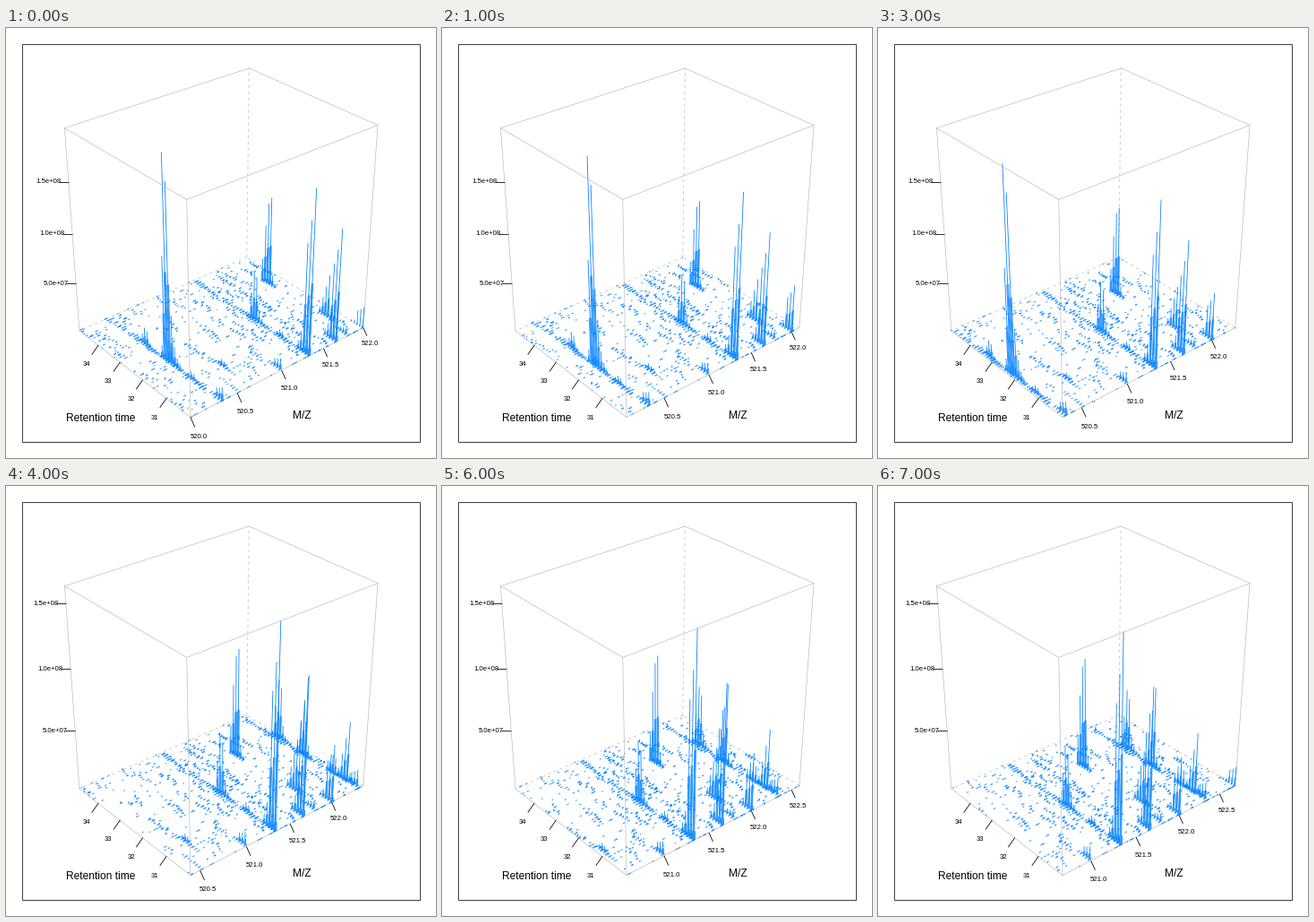
Write a matplotlib script that moves like this. It is 480x480 px and loops after 8000 ms.

```python
import numpy as np
import matplotlib.pyplot as plt
from matplotlib.animation import FuncAnimation
from matplotlib.collections import LineCollection

SIZE, DPI = 480, 100
PX = 72 / DPI            # one pixel in points
BLUE, GREY = "#0080ff", "#bebebe"
SPAN = 2.0               # width of the M/Z window
DV = 1 / 45              # distance between two scans
STEP = 0.008             # distance between two M/Z samples

plt.rcParams["font.family"] = "Liberation Sans"
rng = np.random.default_rng(12)

# Box corners: (M/Z, retention time, intensity) -> screen pixel
CORNERS = {
    (0, 0, 0): (206, 434.5), (1, 0, 0): (399, 334.5),
    (1, 1, 0): (268.5, 256), (0, 1, 0): (82, 338),
    (0, 0, 1): (201.5, 191.5), (1, 0, 1): (415, 108.5),
    (1, 1, 1): (271.5, 45), (0, 1, 1): (65.5, 111.5),
}


def fit_camera():
    """Least-squares perspective matrix from the eight corners."""
    rows, rhs = [], []
    for (u, v, w), (x, y) in CORNERS.items():
        rows.append([u, v, w, 1, 0, 0, 0, 0, -x * u, -x * v, -x * w])
        rows.append([0, 0, 0, 0, u, v, w, 1, -y * u, -y * v, -y * w])
        rhs += [x, y]
    sol = np.linalg.lstsq(np.array(rows, float), np.array(rhs, float), rcond=None)[0]
    return np.append(sol, 1).reshape(3, 4)


CAMERA = fit_camera()


def project(u, v, w):
    u, v, w = np.broadcast_arrays(*(np.asarray(a, float) for a in (u, v, w)))
    x, y, d = np.tensordot(CAMERA, np.stack([u, v, w, np.ones_like(u)]), 1)
    return np.stack([x / d, y / d], axis=-1)


# ---- synthetic spectrum: rows of (M/Z, scan position, intensity / 1e7)
points = []


def dash(mz, v, n, h):
    """Short run of low samples inside one scan."""
    for i in range(n):
        points.append((mz + (i - n / 2) * STEP, v, h * rng.uniform(0.3, 1)))


def spike(mz, v, h):
    """Narrow peak inside one scan."""
    for i in range(-2, 3):
        points.append((mz + i * STEP, v, h * np.exp(-0.8 * i * i)))


# first scan relative to the top, then the share of the top in each scan
ROUND = (-2, [0.06, 0.52, 1, 0.88, 0.25, 0.1, 0.05, 0.03])
LATE = (-3, [0.25, 0.65, 0.92, 1, 0.12, 0.04])
RISE = (-3, [0.12, 0.4, 0.7, 1, 0.15, 0.05])
FRONT = (0, [1, 0.81, 0.67, 0.12, 0.05])

PEAKS = [
    (520.33, 0.458, 19.9, ROUND), (521.33, 0.460, 5.1, ROUND),
    (522.34, 0.436, 6.8, RISE), (521.84, 0.676, 9.3, LATE),
    (522.36, 0.689, 5.1, ROUND), (521.876, 0.206, 4.4, RISE),
    (521.33, 0.003, 16.3, FRONT), (521.66, 0.003, 11.4, FRONT),
    (522.006, 0.003, 4.8, FRONT), (522.35, 0.100, 5.0, RISE),
    (522.35, 0.020, 1.4, FRONT), (522.34, 0.210, 1.5, ROUND),
    (522.70, 0.003, 1.6, FRONT), (521.00, 0.010, 1.1, FRONT),
    (520.33, 0.660, 1.7, ROUND), (520.33, 0.250, 0.7, ROUND),
    (520.34, 0.003, 1.3, FRONT), (520.65, 0.240, 0.6, ROUND),
    (521.33, 0.240, 0.7, ROUND), (521.81, 0.020, 0.6, FRONT),
]

for mz, v0, top, (first, shape) in PEAKS:
    side = 1 if first == 0 else -1
    for i, part in enumerate(shape):
        v = v0 + side * (first + i) * DV
        if 0 <= v <= 1:
            spike(mz, v, top * part)

# isotope ridges running through all scans
for ridge in (520.33, 521.33, 522.345):
    for j in range(46):
        if rng.random() < 0.88:
            dash(ridge + rng.normal(0, 0.008), j * DV, rng.integers(3, 8),
                 rng.uniform(0.04, 0.14))

# short streaks over a few scans
for _ in range(80):
    mz, start = rng.uniform(520, 522.72), rng.integers(0, 42)
    strong = rng.uniform(0.03, 0.25)
    for j in range(start, min(start + rng.integers(3, 8), 46)):
        dash(mz + rng.normal(0, 0.015), j * DV, rng.integers(2, 5),
             strong * rng.uniform(0.3, 1))

# scattered noise, a little denser in the first scan
for _ in range(430):
    dash(rng.uniform(520, 522.72), rng.integers(0, 46) * DV,
         rng.integers(2, 4), rng.uniform(0.01, 0.06))
for _ in range(18):
    dash(rng.uniform(520, 522.72), 0, rng.integers(3, 8), 0.03)

MZ, SCAN, HEIGHT = np.array(points).T

# ---- static parts
fig = plt.figure(figsize=(SIZE / DPI, SIZE / DPI), dpi=DPI, facecolor="white")
ax = fig.add_axes([0, 0, 1, 1])
ax.set_xlim(0, SIZE)
ax.set_ylim(SIZE, 0)
ax.axis("off")


def edge(a, b, hidden=False, z=1):
    (x0, y0), (x1, y1) = project(*a), project(*b)
    ax.plot([x0, x1], [y0, y1], color=GREY, lw=0.7 * PX, zorder=z,
            ls=(0, (5, 5)) if hidden else "-")


def label(x, y, text="", size=7.8):
    return ax.text(x, y, text, size=size * PX, ha="center", va="center", zorder=5)


ax.add_patch(plt.Rectangle((18, 18), 444, 444, fill=False, ec="#404040", lw=PX))

BACK = (1, 1, 0)
names = list(CORNERS)
for i, a in enumerate(names):
    for b in names[i + 1:]:
        if sum(p != q for p, q in zip(a, b)) == 1:
            on_top = a[2] == 1 or (a[:2] == (0, 0) and b[2] == 1)
            edge(a, b, BACK in (a, b), 4 if on_top else 1)

label(106, 436, "Retention time", 12)
label(330.5, 433, "M/Z", 12)

for rt in range(31, 35):
    x, y = project(0, 0.2 + 0.205 * (rt - 31), 0)
    ax.plot([x, x - 7], [y, y + 10], color="black", lw=0.8 * PX)
    label(x - 13, y + 21.5, str(rt))

# ---- moving parts
stems = LineCollection([], colors=BLUE, linewidths=0.8 * PX,
                       capstyle="projecting", zorder=3)
ticks = LineCollection([], colors="black", linewidths=0.8 * PX, zorder=5)
ax.add_collection(stems, autolim=False)
ax.add_collection(ticks, autolim=False)
mz_labels = [label(0, 0) for _ in range(5)]
z_labels = [label(0, 0) for _ in range(3)]


def update(k):
    low = 520 + 0.1 * k
    seen = (MZ >= low - 1e-6) & (MZ <= low + SPAN + 1e-6)
    u, v, h = (MZ[seen] - low) / SPAN, SCAN[seen], HEIGHT[seen]
    top = h.max()
    stems.set_segments(np.stack([project(u, v, 0), project(u, v, h / top)], axis=1))

    marks = []
    values = [m for m in np.arange(520, 523, 0.5) if -1e-6 <= m - low <= SPAN + 1e-6]
    for i, text in enumerate(mz_labels):
        text.set_visible(i < len(values))
        if i < len(values):
            pos = (values[i] - low) / SPAN
            x, y = project(pos, 0, 0)
            s = 1 - 0.17 * pos
            marks.append([(x, y), (x + 5 * s, y + 11 * s)])
            text.set_position((x + 9.3 * s, y + 22 * s))
            text.set_text(f"{values[i]:.1f}")

    for value, text in zip((5, 10, 15), z_labels):
        x, y = project(0, 1, value / top)
        marks.append([(x, y), (x - 11, y)])
        text.set_position((x - 22.5, y))
        text.set_text(f"{value * 1e7:.1e}")
    ticks.set_segments(marks)
    return [stems, ticks, *mz_labels, *z_labels]


anim = FuncAnimation(fig, update, frames=8, interval=1000, repeat=True, blit=False)
plt.show()
```
